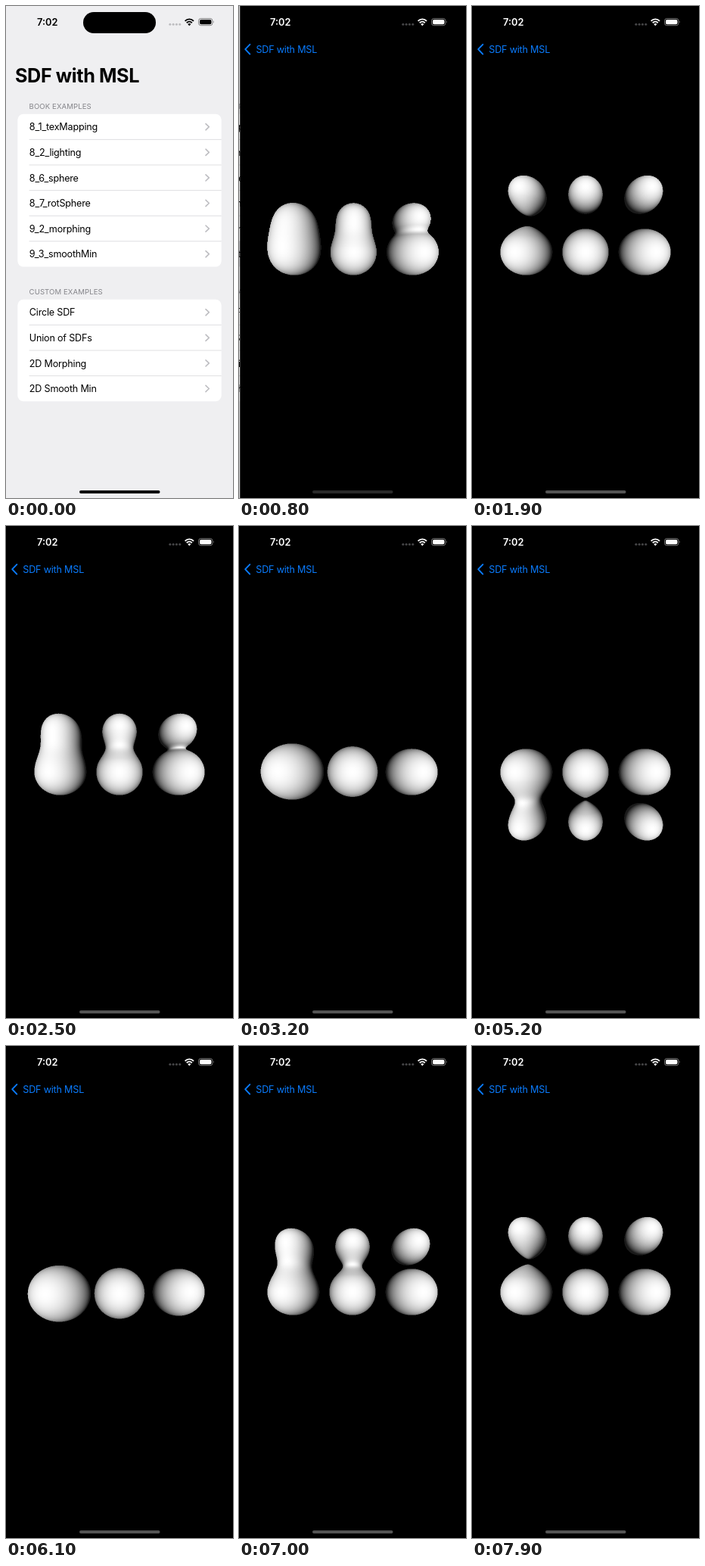
Write an HTML page with a canvas that moves like this. It is 300 px wide and 650 px high and loops after 8 s.

```html
<!DOCTYPE html>
<html lang="en">
<head>
<meta charset="utf-8">
<title>SDF with MSL</title>
<style>
  html, body { margin: 0; width: 100%; height: 100%; overflow: hidden; background: #efeff1; }
  .layer { position: absolute; left: 0; top: 0; width: 300px; height: 650px; overflow: hidden; }
  svg { display: block; font-family: Inter, Roboto, sans-serif; }
  #view { background: #000; }
  canvas { position: absolute; left: 20px; top: 210px; width: 260px; height: 230px; }
  .row { font-size: 12.6px; letter-spacing: -.2px; }
  .head { font-size: 9.6px; letter-spacing: .08px; fill: #85858a; }
  .title { font-size: 25.2px; font-weight: 700; letter-spacing: -.4px; }
  .clock { font-size: 12.8px; font-weight: 600; }
</style>
</head>
<body>
<svg class="layer" viewBox="0 0 300 650">
  <rect width="300" height="650" fill="#efeff1"/>
  <g id="list"></g>
  <rect id="dim" width="300" height="650" opacity="0"/>
</svg>
<div class="layer" id="view"><canvas id="scene" width="520" height="460"></canvas></div>
<svg class="layer" viewBox="0 0 300 650">
  <text class="title" id="title" x="12" y="101">SDF with MSL</text>
  <g id="back" fill="#0a7cff">
    <path d="M14.3 50.8 8.2 57.2l6.1 6.4" fill="none" stroke="#0a7cff" stroke-width="1.9" stroke-linecap="round" stroke-linejoin="round"/>
    <text class="row" x="22.3" y="61.6">SDF with MSL</text>
  </g>
  <rect x="102" y="8" width="96" height="28" rx="14"/>
  <g id="status">
    <text class="clock" x="41" y="26">7:02</text>
    <g id="dots">
      <circle cx="216.8" cy="24.3" r="1.5"/><circle cx="221.1" cy="24.3" r="1.5"/>
      <circle cx="225.4" cy="24.3" r="1.5"/><circle cx="229.7" cy="24.3" r="1.5"/>
    </g>
    <g fill="none" stroke="currentColor" stroke-width="1.9">
      <path d="M236.6 19.8a8 8 0 0 1 11.4 0"/>
      <path d="M238.8 22.2a5 5 0 0 1 7 0"/>
    </g>
    <path d="M242.3 26.2l-2.1-2.2a3 3 0 0 1 4.2 0z"/>
    <rect x="254.5" y="16.5" width="18.4" height="9.2" rx="3" fill="none" stroke="currentColor" stroke-opacity=".45"/>
    <rect x="256" y="18" width="15.4" height="6.2" rx="1.8"/>
    <path d="M274 19.6q1.4 1.5 0 3z" opacity=".5"/>
  </g>
  <rect id="home" x="97" y="640" width="106.5" height="4" rx="2"/>
</svg>
<script>
const $ = id => document.getElementById(id);
const LOOP = 8000, STEP = 100, PUSH = 400, ROW = 33.6;

const groups = [
  { head: 'BOOK EXAMPLES', top: 142.8, rows: ['8_1_texMapping', '8_2_lighting', '8_6_sphere', '8_7_rotSphere', '9_2_morphing', '9_3_smoothMin'] },
  { head: 'CUSTOM EXAMPLES', top: 387.8, rows: ['Circle SDF', 'Union of SDFs', '2D Morphing', '2D Smooth Min'] }
];

function groupMarkup({ head, top, rows }, index) {
  const bottom = top + rows.length * ROW;
  let out = `<text class="head" x="30.6" y="${top - 7}">${head}</text>
    <rect x="15.3" y="${top}" width="269.4" height="${rows.length * ROW}" rx="7.6" fill="#fff"/>`;
  if (index === 0) {
    out += `<path id="pressed" fill="#d6d6da" d="M15.3 ${bottom - ROW}h269.4v26a7.6 7.6 0 0 1-7.6 7.6h-254.2a7.6 7.6 0 0 1-7.6-7.6z"/>`;
  }
  rows.forEach((label, i) => {
    const y = top + i * ROW, mid = y + ROW / 2;
    if (i) out += `<path d="M30.6 ${y}H284.7" stroke="#d2d2d5" stroke-width=".7"/>`;
    out += `<text class="row" x="30.8" y="${mid + 4.7}">${label}</text>
      <path d="M264 ${mid - 4}l4.3 4.1-4.3 4.1" fill="none" stroke="#bebec2" stroke-width="1.6" stroke-linecap="round" stroke-linejoin="round"/>`;
  });
  return out;
}
$('list').innerHTML = groups.map(groupMarkup).join('');

const canvas = $('scene'), ctx = canvas.getContext('2d');
const { width: W, height: H } = canvas;
const BIG = 0.4, SMALL = 0.3, BLEND = [0.5, 0.3, 0.1];

// Brightness of a ray through (u, v): camera at z = 2, light along z, 0 on a miss.
function shade(u, v, ballY) {
  const column = u < -0.24 ? 0 : u > 0.24 ? 2 : 1;
  const k = BLEND[column], len = Math.sqrt(u * u + v * v + 1);
  let depth = 1.4;
  for (let i = 0; i < 60; i++) {
    const x = u * depth - (column - 1), y = v * depth, z = 2 - depth, dy = y - ballY;
    if (z < -0.6) return 0;
    const xz = x * x + z * z;
    const la = Math.sqrt(xz + dy * dy), lb = Math.sqrt(xz + y * y);
    const a = la - SMALL, b = lb - BIG;
    const over = Math.max(k - Math.abs(a - b), 0);
    const d = Math.min(a, b) - over * over / (4 * k);
    if (d < 0.001) {
      const h = Math.min(Math.max(0.5 + 0.5 * (b - a) / k, 0), 1);
      const side = h / la + (1 - h) / lb;
      const ny = h * dy / la + (1 - h) * y / lb;
      const nz = z * side;
      const norm = Math.sqrt(side * side * xz + ny * ny);
      return 0.1 + 0.9 * Math.max(nz / norm, 0);
    }
    depth += d / len;
  }
  return 0;
}

function drawScene(time) {
  const ballY = Math.sin(1.066 * time / 1000 - 0.287);
  const image = ctx.createImageData(W, H), data = image.data;
  for (let j = 0, p = 0; j < H; j++) {
    const v = (325 - 210 - (j + 0.5) / 2) / 150;
    for (let i = 0; i < W; i++, p += 4) {
      const u = (20 + (i + 0.5) / 2 - 150) / 150;
      data[p] = data[p + 1] = data[p + 2] = 255 * shade(u, v, ballY);
      data[p + 3] = 255;
    }
  }
  ctx.putImageData(image, 0, 0);
}

function drawInterface(time) {
  const w = Math.max(time - PUSH, 0) * 0.019;
  const rest = (1 + w) * Math.exp(-w), done = 1 - rest;
  const grey = n => `rgb(${n},${n},${n})`;
  const ink = time > PUSH + 50 ? '#fff' : '#000';
  $('view').style.transform = `translateX(${300 * rest}px)`;
  $('list').setAttribute('transform', `translate(${-90 * done} 0)`);
  $('dim').setAttribute('opacity', 0.1 * done);
  $('pressed').setAttribute('opacity', time >= PUSH ? 1 : 0);
  $('title').setAttribute('opacity', rest * rest);
  $('title').setAttribute('transform', `translate(${10 * done} ${-30 * done})`);
  $('back').setAttribute('opacity', done);
  $('back').setAttribute('transform', `translate(${20 * rest} 0)`);
  $('status').setAttribute('fill', ink);
  $('status').style.color = ink;
  $('dots').setAttribute('fill', ink === '#fff' ? '#464648' : '#bdbdc0');
  $('home').setAttribute('fill', grey(time < 700 ? 0 : time < 900 ? 42 : 84));
}

const start = performance.now();
let shown = -1;
function tick() {
  const time = Math.floor((performance.now() - start) % LOOP / STEP) * STEP;
  if (time !== shown) {
    shown = time;
    drawInterface(time);
    if (time >= PUSH) drawScene(time);
  }
  requestAnimationFrame(tick);
}
tick();
</script>
</body>
</html>
```
